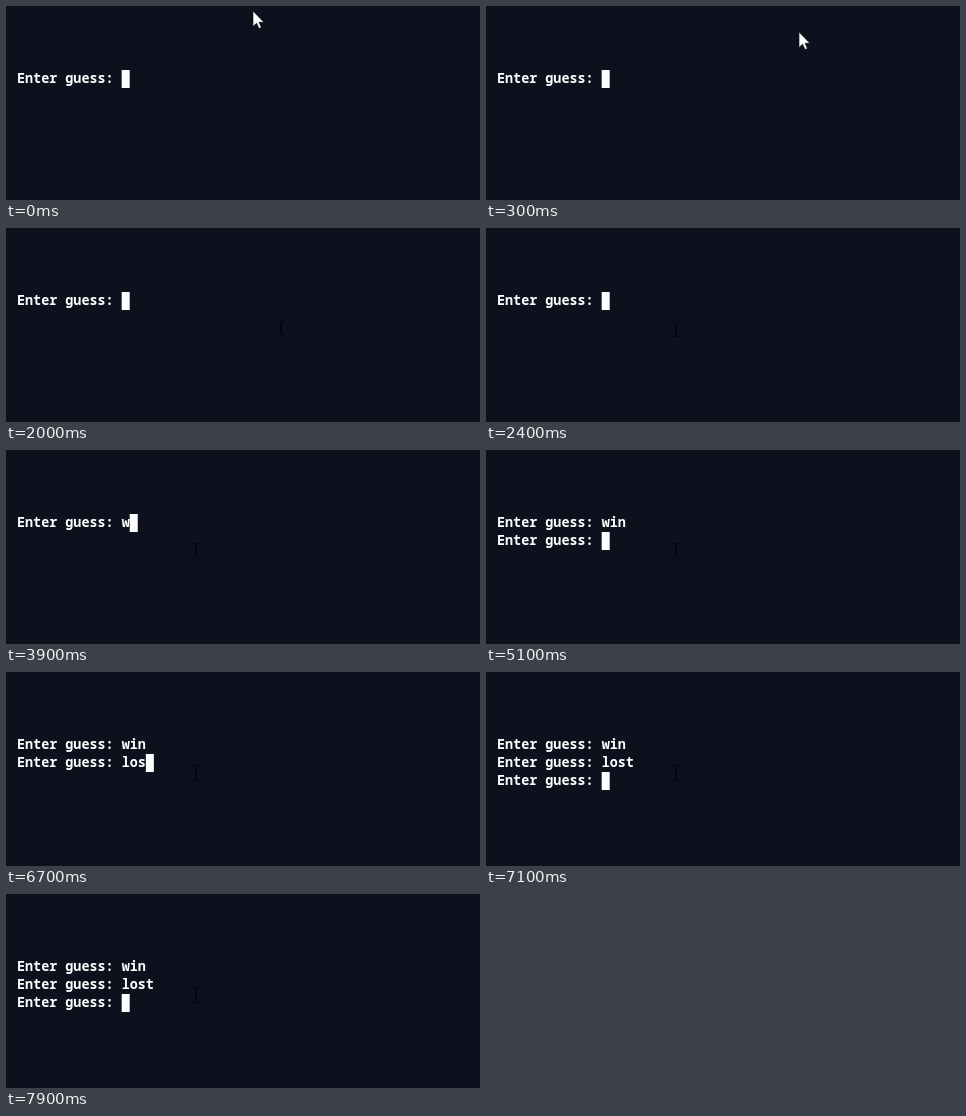
Recreate the animation shown at these times as an HTML page. Size 474x194 px, loop 8000 ms.

```html
<!DOCTYPE html>
<html lang="en">
<head>
<meta charset="utf-8">
<title>Guessing prompt</title>
<style>
  html, body { margin: 0; width: 100%; height: 100%; overflow: hidden; background: #0d111e; }
  .stage {
    position: relative; width: 474px; height: 194px; overflow: hidden;
    font: 600 13.43px/18px "Noto Sans Mono", monospace; color: #fff;
  }
  .stage > * { position: absolute; animation: 8s step-end infinite; }
  .line { left: 11px; height: 18px; overflow: hidden; white-space: pre; }
  #first { top: 63px; animation-name: type-first; }
  #second { top: 81px; animation-name: type-second; }
  #third { top: 99px; animation-name: type-third; }
  #caret { left: 11px; top: 63.5px; width: 1ch; height: 18.5px; background: #fff; animation-name: caret; }
  #arrow { left: 0; top: 0; animation-name: arrow; }
  #beam { left: -5px; top: -9px; animation-name: beam; }

  /* Each line is revealed in whole character cells. */
  @keyframes type-first {
    0% { width: 13ch; }
    48.75% { width: 14ch; }
    52.5% { width: 15ch; }
    57.5%, 100% { width: 16ch; }
  }
  @keyframes type-second {
    0% { width: 0; }
    61.25% { width: 13ch; }
    83.75% { width: 16ch; }
    85%, 100% { width: 17ch; }
  }
  @keyframes type-third {
    0% { width: 0; }
    88.75%, 100% { width: 13ch; }
  }
  @keyframes caret {
    0% { transform: translate(13ch, 0); }
    48.75% { transform: translate(14ch, 0); }
    52.5% { transform: translate(15ch, 0); }
    57.5% { transform: translate(16ch, 0); }
    61.25% { transform: translate(13ch, 18px); }
    83.75% { transform: translate(16ch, 18px); }
    85% { transform: translate(17ch, 18px); }
    88.75%, 100% { transform: translate(13ch, 36px); }
  }
  @keyframes arrow {
    0% { transform: translate(246px, 4px); visibility: visible; }
    1.25% { transform: translate(270px, 13px); }
    2.5% { transform: translate(301px, 23px); }
    3.75% { transform: translate(312px, 25px); visibility: visible; }
    25%, 100% { transform: translate(312px, 25px); visibility: hidden; }
  }
  @keyframes beam {
    0% { transform: translate(275px, 100px); visibility: hidden; }
    25% { transform: translate(275px, 100px); visibility: visible; }
    26.25% { transform: translate(254px, 125px); }
    27.5% { transform: translate(228px, 133px); }
    28.75% { transform: translate(204px, 117px); }
    30%, 100% { transform: translate(190px, 101px); visibility: visible; }
  }
</style>
</head>
<body>
<div class="stage">
  <div class="line" id="first">Enter guess: win</div>
  <div class="line" id="second">Enter guess: lost</div>
  <div class="line" id="third">Enter guess: </div>
  <div id="caret"></div>
  <svg id="arrow" width="13" height="20">
    <path d="M1 1V16.5L4.6 13.2L7 18.6L9.4 17.5L7 12.3H11.8Z" fill="#fff" stroke="#05070d" stroke-width=".6"/>
  </svg>
  <svg id="beam" width="10" height="18">
    <path d="M1.5 1.5H4M6 1.5H8.5M5 2V16M1.5 16.5H4M6 16.5H8.5" fill="none" stroke="#020307"/>
  </svg>
</div>
</body>
</html>
```
